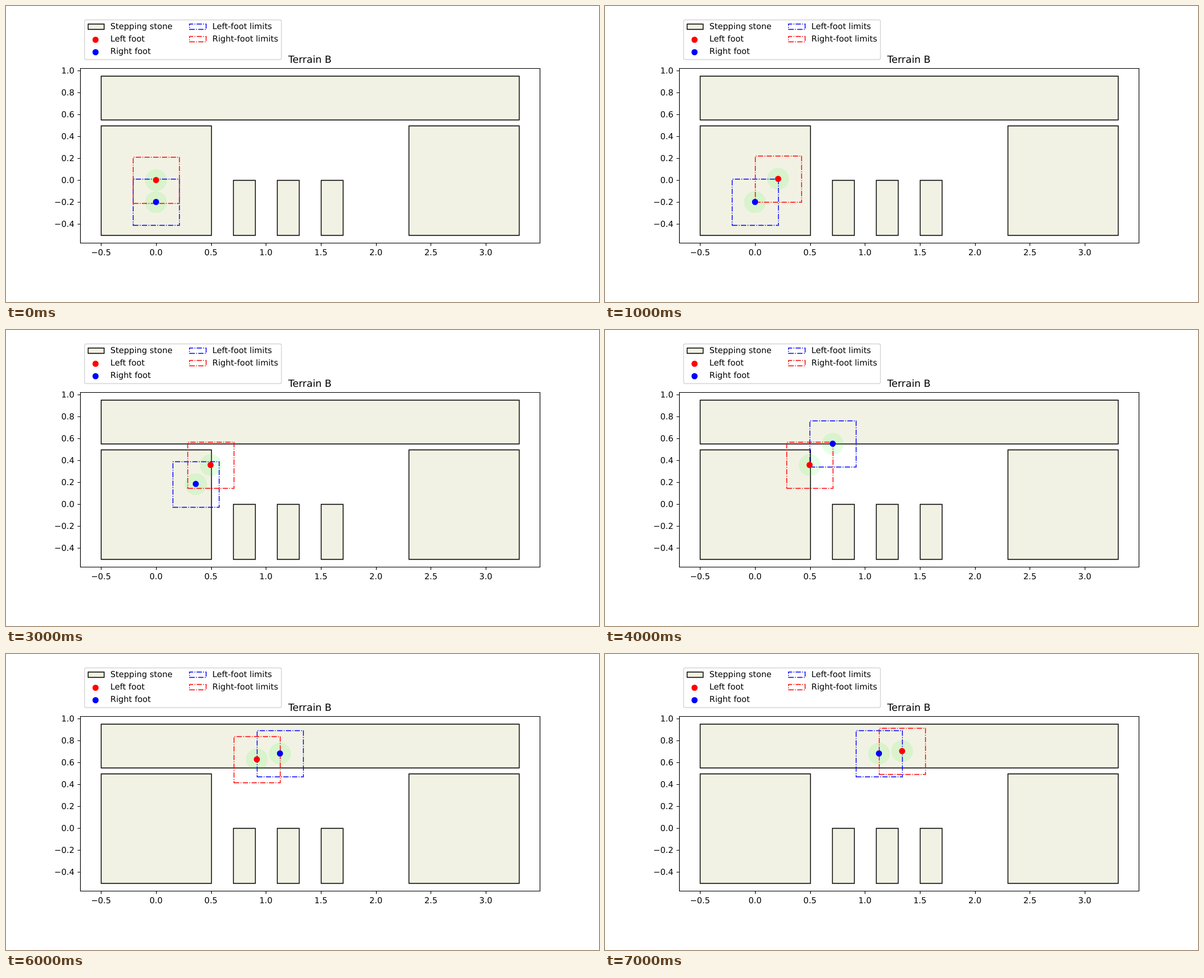
An HTML page for the animation above (8000 ms loop, 1000 px wide and 500 px high).

```html
<!DOCTYPE html>
<html lang="en">
<head>
<meta charset="utf-8">
<title>Terrain B</title>
<style>
  html, body { margin: 0; width: 100%; height: 100%; overflow: hidden; background: #fff; }
  svg { display: block; width: 1000px; height: 500px; }
  text {
    font: 13.89px "DejaVu Sans", sans-serif;
    text-rendering: geometricPrecision;
  }
  .title { font-size: 16.67px; }
  .mid { text-anchor: middle; }
  .end { text-anchor: end; }
  .axis { fill: none; stroke: #000; stroke-width: 1.11; }
  .stone { fill: #f2f2e4; stroke: #000; stroke-width: 1.39; }
  .frame { fill: #fff; stroke: #d6d6d6; stroke-width: 1.39; }
  .limits { fill: none; stroke-width: 1.39; stroke-dasharray: 8.89 2.22 1.39 2.22; }
  .halo { fill: #0f0; fill-opacity: .1; }
</style>
</head>
<body>
<svg id="stage" viewBox="0 0 1000 500"></svg>
<script>
const stage = document.getElementById('stage');
const UNIT = 775 / 4.18;      // pixels per metre
const REACH = 0.21;           // half the side of a step-limit box
const STEP_MS = 1000;
const STEPS = 8;

const px = x => 125 + (x + 0.69) * UNIT;
const py = y => 400.36 - (y + 0.5725) * UNIT;
const snap = v => Math.round(v) + 0.5;

function add(tag, attrs, text) {
  const el = document.createElementNS('http://www.w3.org/2000/svg', tag);
  for (const key in attrs) el.setAttribute(key, attrs[key]);
  if (text) el.textContent = text;
  return stage.appendChild(el);
}

// Outline from the lower left corner, anticlockwise, on whole pixels
const box = (left, top, right, bottom) =>
  `M${snap(left)} ${snap(bottom)}H${snap(right)}V${snap(top)}H${snap(left)}Z`;

const label = (x, y, text, cls = '') => add('text', { x, y, class: cls }, text);
const dot = (cx, cy, fill) => add('circle', { cx, cy, r: 5.2, fill });

function drawStones() {
  const stones = [
    [-0.5, 0.5, 0.5, -0.5],
    [0.7, 0, 0.9, -0.5],
    [1.1, 0, 1.3, -0.5],
    [1.5, 0, 1.7, -0.5],
    [2.3, 0.5, 3.3, -0.5],
    [-0.5, 0.95, 3.3, 0.55]
  ];
  for (const [l, t, r, b] of stones) {
    add('path', { class: 'stone', d: box(px(l), py(t), px(r), py(b)) });
  }
}

function drawAxes() {
  let d = box(125, 104.64, 900, 400.36);
  const format = v => v.toFixed(1).replace('-', '\u2212');
  for (let i = -1; i <= 6; i++) {
    const x = px(i / 2);
    d += `M${snap(x)} 400.5v4.86`;
    label(x, 421, format(i / 2), 'mid');
  }
  for (let i = -2; i <= 5; i++) {
    const y = py(i / 5);
    d += `M125.5 ${snap(y)}h-4.86`;
    label(115.3, Math.round(y + 5), format(i / 5), 'end');
  }
  add('path', { class: 'axis', d });
  label(512.5, 96, 'Terrain B', 'title mid');
}

function drawLegend() {
  add('rect', { class: 'frame', x: 132.5, y: 23.5, width: 332, height: 67, rx: 2.8 });
  add('path', { class: 'stone', d: box(138, 30, 165, 39) });
  dot(151, 57, '#f00');
  dot(151, 78, '#00f');
  add('path', { class: 'limits', stroke: '#00f', d: box(309, 30, 337, 39) });
  add('path', { class: 'limits', stroke: '#f00', d: box(309, 51, 337, 60) });
  label(176, 39, 'Stepping stone');
  label(176, 60, 'Left foot');
  label(176, 81, 'Right foot');
  label(348, 39, 'Left-foot limits');
  label(348, 60, 'Right-foot limits');
}

// Footholds in metres, in walking order
const left = {
  color: '#f00',
  path: [[0, 0], [0.21, 0.012], [0.498, 0.357], [0.918, 0.627], [1.338, 0.702]]
};
const right = {
  color: '#00f',
  path: [[0, -0.2], [0.362, 0.182], [0.708, 0.55], [1.128, 0.68]]
};
const feet = [right, left];

function place(foot, index) {
  const [x, y] = foot.path[index];
  foot.halo.setAttribute('cx', px(x));
  foot.halo.setAttribute('cy', py(y));
  foot.mark.setAttribute('cx', Math.round(px(x)));
  foot.mark.setAttribute('cy', Math.round(py(y)));
  foot.limits.setAttribute('d',
    box(px(x - REACH), py(y + REACH), px(x + REACH), py(y - REACH)));
}

// The feet take turns, left first; each pose is held for one step
function render(ms) {
  const step = Math.floor(ms / STEP_MS) % STEPS;
  place(left, (step + 1) >> 1);
  place(right, step >> 1);
}

drawStones();
for (const f of feet) f.halo = add('circle', { class: 'halo', r: 0.1 * UNIT });
for (const f of feet) f.limits = add('path', { class: 'limits', stroke: f.color });
drawAxes();
for (const f of feet) f.mark = dot(0, 0, f.color);
drawLegend();
render(0);

const start = performance.now();
function tick() {
  render(performance.now() - start);
  requestAnimationFrame(tick);
}
requestAnimationFrame(tick);
</script>
</body>
</html>
```
